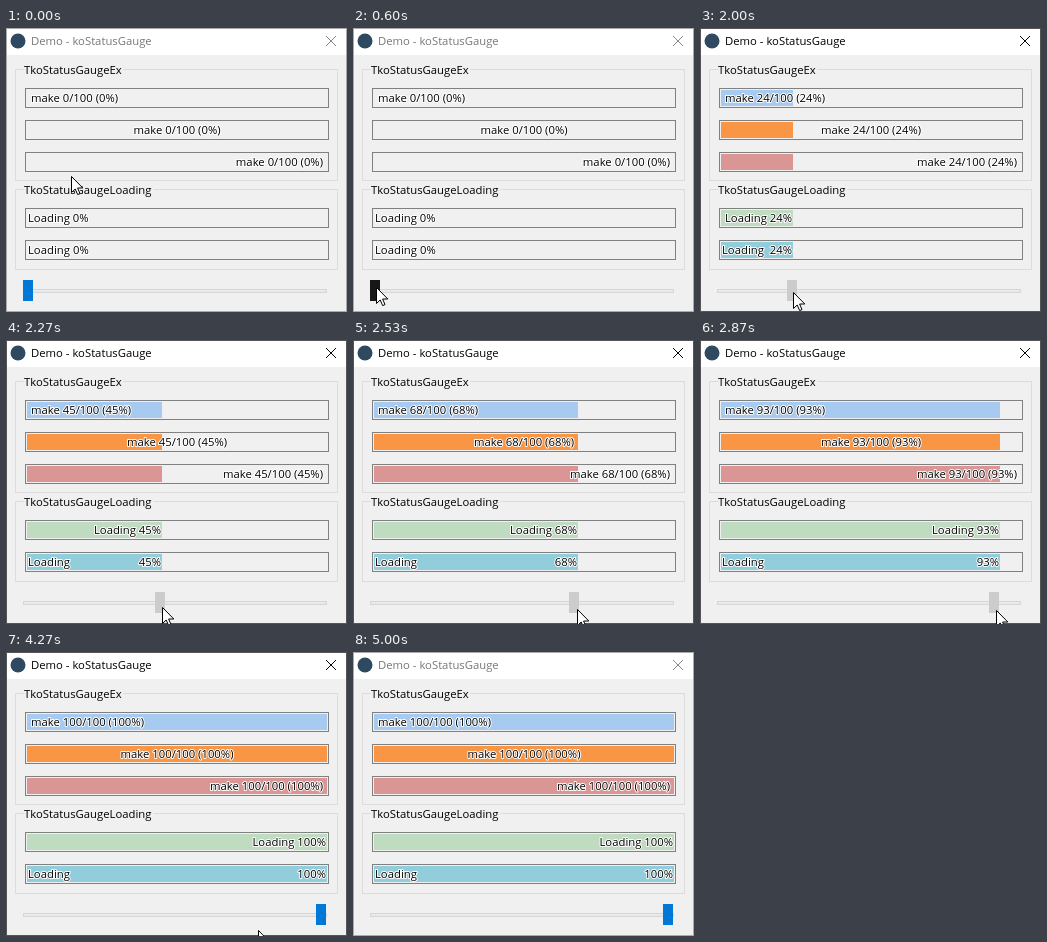
An HTML page that plays this animation: 341x284 px, repeating every 5.47 s.

```html
<!DOCTYPE html>
<html lang="en">
<head>
<meta charset="utf-8">
<title>Progress bar demo</title>
<style>
  html, body { margin: 0; width: 100%; height: 100%; overflow: hidden; background: #f0f0f0; }
  svg { display: block; width: 341px; height: 284px; }
  text { font: 11.3px "Open Sans", "Noto Sans", sans-serif; white-space: pre; paint-order: stroke; stroke-linejoin: round; }
  .group rect { fill: none; stroke: #dcdcdc; }
  .group text { stroke: #f0f0f0; stroke-width: 5px; }
  .label { stroke: #fff; stroke-width: 2px; }
</style>
</head>
<body>
<svg id="stage" viewBox="0 0 341 284">
  <rect width="341" height="284" fill="#f0f0f0"/>
  <rect width="341" height="27" fill="#fff"/>
  <rect id="border" x=".5" y=".5" width="340" height="283" fill="none"/>
  <circle cx="12" cy="13" r="7.5" fill="#2f4a60"/>
  <text id="title" x="25" y="17">Demo - koStatusGauge</text>
  <path id="close" d="M320 8l10 10m0-10l-10 10" fill="none"/>
  <g class="group">
    <rect x="9.5" y="41.5" width="322" height="111"/>
    <text x="18" y="46">TkoStatusGaugeEx</text>
    <rect x="9.5" y="161.5" width="322" height="80"/>
    <text x="18" y="166">TkoStatusGaugeLoading</text>
  </g>
  <g id="bars"></g>
  <rect x="17.5" y="261.5" width="303" height="3" fill="#e7eaea" stroke="#d6d6d6"/>
  <rect id="thumb" y="252" width="10" height="21"/>
  <path id="cursor" d="M.5 .5V16.5L4.2 13L6.7 18.6L9 17.6L6.6 12H11.8Z" fill="#fff" stroke="#000"/>
</svg>
<script>
const LOOP = 5470, TICK = 1000 / 15;
const PRESS = 17, RELEASE = 54, BLUR = 75; // in ticks

// Mouse path: [tick, x, y]
const path = [
  [0, 65, 148], [9, 23, 259], [19, 23, 259], [24, 42, 259], [30, 93, 264],
  [38, 224, 269], [46, 321, 271], [52, 334, 272], [55, 334, 272],
  [58, 323, 270], [62, 323, 270], [64, 252, 278], [65, 215, 290], [82, 215, 290]
];

const $ = id => document.getElementById(id);
const bars = $('bars');

function set(node, attrs) {
  for (const name in attrs) node.setAttribute(name, attrs[name]);
  return node;
}

function add(tag, attrs) {
  const node = document.createElementNS(bars.namespaceURI, tag);
  return bars.appendChild(set(node, attrs));
}

function addBar(y, color) {
  add('rect', { x: 19.5, y: y + .5, width: 303, height: 19, fill: 'none', stroke: '#808080' });
  return add('rect', { x: 21, y: y + 2, height: 16, fill: color });
}

const addLabel = (x, y, anchor) =>
  add('text', { x, y: y + 14, 'text-anchor': anchor, class: 'label' });

const fills = [
  addBar(60, '#a6caf0'), addBar(92, '#f99645'), addBar(124, '#d99694'),
  addBar(180, '#c0dcc0'), addBar(212, '#92cddc')
];
const makeLabels = [addLabel(25, 60, 'start'), addLabel(171, 92, 'middle'), addLabel(317, 124, 'end')];
const loading = addLabel(22, 180, 'start');
addLabel(22, 212, 'start').textContent = 'Loading';
const percentLabel = addLabel(67, 212, 'start');

const secant = (i, axis) => {
  const a = path[i], b = path[i + 1];
  return a && b ? (b[axis] - a[axis]) / (b[0] - a[0]) : 0;
};

// Monotone cubic slope, so that holds stay still
function slope(i, axis) {
  const before = secant(i - 1, axis), after = secant(i, axis);
  return before * after > 0 ? 2 * before * after / (before + after) : 0;
}

function mouse(tick, axis) {
  const i = path.findIndex((key, n) => n === path.length - 2 || tick < path[n + 1][0]);
  const a = path[i], b = path[i + 1], span = b[0] - a[0];
  const u = (tick - a[0]) / span, v = 1 - u;
  return a[axis] * v * v * (1 + 2 * u) + b[axis] * u * u * (3 - 2 * u)
    + span * u * v * (slope(i, axis) * v - slope(i + 1, axis) * u);
}

// Right-aligns a label to the end of the fill, but never left of its minimum
function follow(label, text, end, min) {
  label.textContent = text;
  set(label, { x: Math.max(min, end - label.getComputedTextLength()) });
}

function draw(time) {
  const tick = Math.floor((time % LOOP + 4) / TICK);
  const x = Math.round(mouse(tick, 1)), y = Math.round(mouse(tick, 2));
  const active = tick >= PRESS && tick < BLUR;
  const dragged = tick >= RELEASE ? 100 : tick < PRESS ? 0 : (x - 24) / 2.93;
  const percent = Math.max(0, Math.min(100, Math.round(dragged)));

  set($('border'), { stroke: active ? '#555' : '#aaa' });
  set($('title'), { fill: active ? '#000' : '#777' });
  set($('close'), { stroke: active ? '#000' : '#888' });

  for (const fill of fills) set(fill, { width: percent * 3 });
  for (const label of makeLabels) label.textContent = `make ${percent}/100 (${percent}%)`;
  const end = 20 + percent * 3;
  follow(loading, `Loading ${percent}%`, end, 22);
  follow(percentLabel, `${percent}%`, end, 67);

  const pressed = tick >= PRESS && tick < RELEASE;
  const hover = tick < PRESS && y >= 252;
  set($('thumb'), {
    x: Math.round(17 + percent * 2.93),
    fill: pressed ? '#ccc' : hover ? '#171717' : '#0078d7'
  });
  set($('cursor'), { transform: `translate(${x} ${y})` });
}

const start = performance.now();
function frame() {
  draw(performance.now() - start);
  requestAnimationFrame(frame);
}
frame();
</script>
</body>
</html>
```
